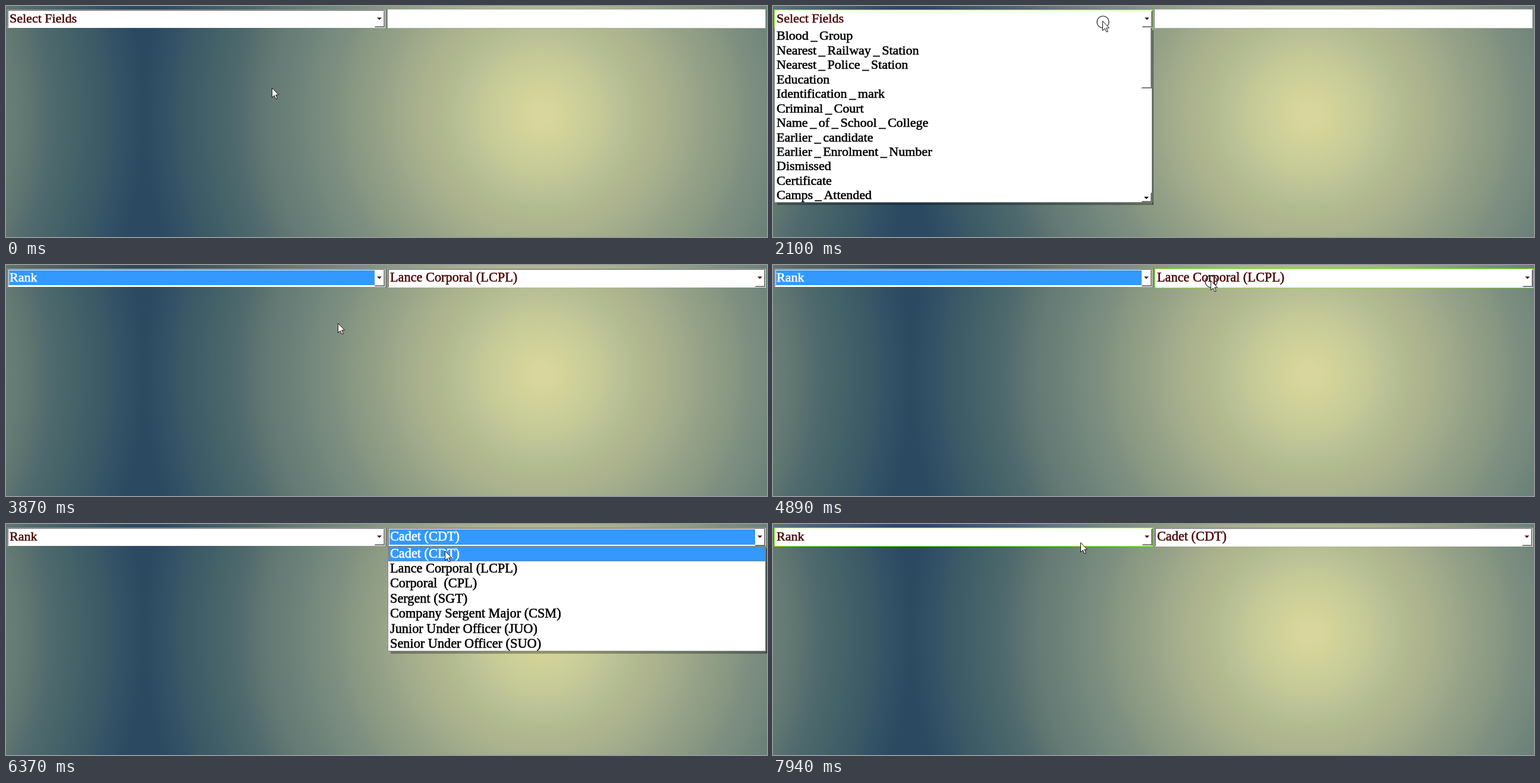
An HTML page with a canvas that plays this animation: 1280 px wide and 390 px high, repeating every 8 s.

```html
<!DOCTYPE html>
<html>
<head>
<meta charset="utf-8">
<style>
html, body { margin: 0; width: 100%; height: 100%; overflow: hidden; }
canvas { display: block; }
</style>
</head>
<body>
<canvas id="stage" width="1280" height="390"></canvas>
<script>
const ctx = document.getElementById('stage').getContext('2d');
const LOOP = 8000, BLUE = '#3399ff', MAROON = '#4b0a0a', GREEN = '#7fff00';
const FONT = '"Liberation Serif", "Times New Roman", serif';

const fields = ('Select Fields,Enrolment_Number,Rank,Aadhaar_Number,Student_Name,Fathers_Name,' +
  'Mothers_Name,Sex,Date_Of_Birth,Address,Enrol_Date,Email,Mobile_Number,Blood_Group,' +
  'Nearest_Railway_Station,Nearest_Police_Station,Education,Identification_mark,' +
  'Criminal_Court,Name_of_School_College,Earlier_candidate,Earlier_Enrolment_Number,' +
  'Dismissed,Certificate,Camps_Attended').split(',');
const ranks = ['Cadet (CDT)', 'Lance Corporal (LCPL)', 'Corporal  (CPL)', 'Sergent (SGT)',
  'Company Sergent Major (CSM)', 'Junior Under Officer (JUO)', 'Senior Under Officer (SUO)'];

// outer radius and colour of each backdrop ring
const rings = [[29, '#d8d69d'], [52, '#d3d398'], [80, '#cccf9a'], [113, '#c5ca96'],
  [141, '#bcc297'], [176, '#b2bb90'], [203, '#aeb48e'], [234, '#a6af8c'], [252, '#9fa98b'],
  [270, '#99a488'], [300, '#929f86'], [320, '#8b9a83'], [340, '#859581'], [360, '#7e8f80'],
  [380, '#798c7f'], [400, '#74887c'], [420, '#6e837a'], [437, '#6a7f77'], [470, '#667b75'],
  [497, '#5c736f'], [517, '#526b6f'], [540, '#4b676c'], [560, '#466468'], [580, '#415f68'],
  [610, '#3d5b65'], [650, '#345266'], [690, '#2b4a61']];

// cursor moves: start time, number of 60 ms steps, end point
const moves = [[60, 7, 461, 80], [670, 14, 526, 45], [1510, 3, 548, 35], [1690, 2, 554, 25],
  [2720, 8, 557, 81], [3200, 3, 558, 98], [4050, 14, 736, 26], [5580, 7, 738, 45],
  [6800, 6, 645, 55], [7160, 8, 551, 44], [7640, 6, 517, 31]];
const clicks = [[1930, 2220], [3690, 3870], [4890, 5080], [6250, 6370]];

const clamp = v => Math.max(0, Math.min(1, v));
const within = (t, a, b) => t >= a && t < b;

function rect(x, y, w, h, color) {
  ctx.fillStyle = color;
  ctx.fillRect(x, y, w, h);
}

function frame(x, y, w, h, color) {
  ctx.strokeStyle = color;
  ctx.lineWidth = 1;
  ctx.strokeRect(x + .5, y + .5, w - 1, h - 1);
}

// semi-bold text with a little air around underscores
function label(text, x, y, size, color) {
  const spaced = text.replaceAll('_', '\u2006_\u2006');
  ctx.font = `${size}px ${FONT}`;
  ctx.fillStyle = ctx.strokeStyle = color;
  ctx.lineWidth = .6;
  ctx.fillText(spaced, x, y);
  ctx.strokeText(spaced, x, y);
}

function triangle(x, y, dir, color) {
  ctx.fillStyle = color;
  ctx.beginPath();
  ctx.moveTo(x - 4, y - 2 * dir);
  ctx.lineTo(x + 4, y - 2 * dir);
  ctx.lineTo(x, y + 2 * dir);
  ctx.fill();
}

// shaded right and bottom edges of a raised button
function raised(x, y, w, h) {
  rect(x + w - 2, y + 1, 1, h - 2, '#a0a0a0');
  rect(x + 1, y + h - 2, w - 2, 1, '#a0a0a0');
  rect(x + w - 1, y, 1, h, '#555');
  rect(x, y + h - 1, w, 1, '#555');
}

function makeBackdrop() {
  const c = document.createElement('canvas');
  c.width = 1280;
  c.height = 390;
  const g = c.getContext('2d');
  for (const [cx, x, w] of [[901, 232, 1048], [-437, 0, 232]]) {
    const fade = g.createRadialGradient(cx, 184, 0, cx, 184, 700);
    let inner = 0;
    for (const [outer, color] of rings) {
      fade.addColorStop((inner + outer) / 1400, color);
      inner = outer;
    }
    g.fillStyle = fade;
    g.fillRect(x, 0, w, 390);
  }
  return c;
}
const backdrop = makeBackdrop();

function combo(x, h, text, size, state) {
  const hot = state === 'hot', sel = state === 'selected', shift = hot ? 1 : 0;
  rect(x, 6, 636, h, '#fff');
  if (hot) {
    frame(x, 6, 638, h + 1, GREEN);
  } else {
    rect(x, 6, 636, 1, '#a0a0a0');
    rect(x, 6, 1, h, '#a0a0a0');
    rect(x + 1, 7, 634, 1, '#696969');
    rect(x + 1, 7, 1, h - 2, '#696969');
  }
  if (sel) rect(x + 3, 9, 615, h - 6, BLUE);
  raised(x + 618 + shift, 8, 17, h - 3);
  triangle(x + 626 + shift, 21.5, 1, MAROON);
  label(text, x + 4, 28, size, sel ? '#fff' : MAROON);
}

// list sliding out from under its combo box
function dropList(x, w, items, rowH, size, shown, active, bar) {
  const h = Math.floor(items.length * rowH) - 1, open = Math.round(h * shown);
  if (!open) return;
  const rowW = bar ? w - 17 : w;
  rect(x + 5, 38 + open, w - 3, 4, 'rgba(0,0,0,.3)');
  rect(x + w, 41, 2, open, 'rgba(0,0,0,.4)');
  ctx.save();
  ctx.beginPath();
  ctx.rect(x, 37, w, open + 1);
  ctx.clip();
  ctx.translate(0, open - h);
  rect(x, 37, w, h + 1, '#fff');
  frame(x, 37, w, h + 1, '#8a8a8a');
  items.forEach((text, i) => {
    const y = Math.round(37.5 + i * rowH), on = i === active;
    if (on) {
      rect(x + 1, y, rowW - 2, Math.floor(rowH), BLUE);
      ctx.setLineDash([1, 1]);
      frame(x + 1, y, rowW - 2, Math.floor(rowH), '#cc6600');
      ctx.setLineDash([]);
    }
    label(text, x + 4, y + rowH / 2 + 6, size, on ? '#fff' : '#000');
  });
  if (bar) {
    const sx = x + w - 18;
    triangle(sx + 8, 45, -1, '#000');
    triangle(sx + 8, 640, 1, '#000');
    raised(sx, 38, 17, 16);
    raised(sx, 54, 17, 401);
    raised(sx, 631, 17, 16);
  }
  ctx.restore();
}

function cursorAt(t) {
  let x = 447, y = 138;
  for (const [start, steps, tx, ty] of moves) {
    if (t < start) break;
    const p = clamp((Math.floor((t - start) / 60) + 1) / steps);
    x += (tx - x) * p;
    y += (ty - y) * p;
  }
  return [Math.round(x), Math.round(y)];
}

function drawCursor(t, x, y) {
  if (clicks.some(([a, b]) => within(t, a, b))) {
    ctx.strokeStyle = '#222';
    ctx.lineWidth = 1.2;
    ctx.beginPath();
    ctx.arc(x + 1, y + 2, 10, 0, 7);
    ctx.stroke();
  }
  ctx.save();
  ctx.translate(x + .5, y + .5);
  const arrow = new Path2D('M0 0V16L3.7 12.5L6.2 18H8.5V16.8L6.2 11.5H11Z');
  ctx.fillStyle = '#fff';
  ctx.fill(arrow);
  ctx.strokeStyle = '#111';
  ctx.lineWidth = 1;
  ctx.stroke(arrow);
  ctx.restore();
}

function draw(t) {
  const [x, y] = cursorAt(t);
  ctx.drawImage(backdrop, 0, 0);
  rect(638, 6, 3, 32, '#7d8a76');

  const picked = t >= 3870;
  const leftHot = within(t, 1690, 2220) || (t >= 7640 && y < 38);
  const leftSel = within(t, 3870, 4950);
  combo(2, 31, picked ? 'Rank' : 'Select Fields', 22, leftHot ? 'hot' : leftSel ? 'selected' : '');

  if (picked) {
    const hot = within(t, 4050, 5080) && y < 38;
    const sel = within(t, 6370, 7000);
    combo(642, 32, ranks[t < 6370 ? 1 : 0], 22.3, hot ? 'hot' : sel ? 'selected' : '');
  } else {
    rect(642, 5, 636, 33, '#a9ada4');
    rect(642, 6, 635, 31, '#fff');
  }

  if (within(t, 1990, 3870)) {
    const row = Math.max(0, Math.floor((y - 37.5) / 24.45));
    dropList(2, 636, fields, 24.45, 22, clamp((t - 1990) / 230), row, true);
  }
  if (within(t, 4950, 6430)) {
    dropList(642, 636, ranks, 25.45, 22.3, clamp((t - 4940) / 140), y > 38 ? 0 : 1, false);
  }
  drawCursor(t, x, y);
}

function tick() {
  draw(performance.now() % LOOP);
  requestAnimationFrame(tick);
}
tick();
</script>
</body>
</html>
```
